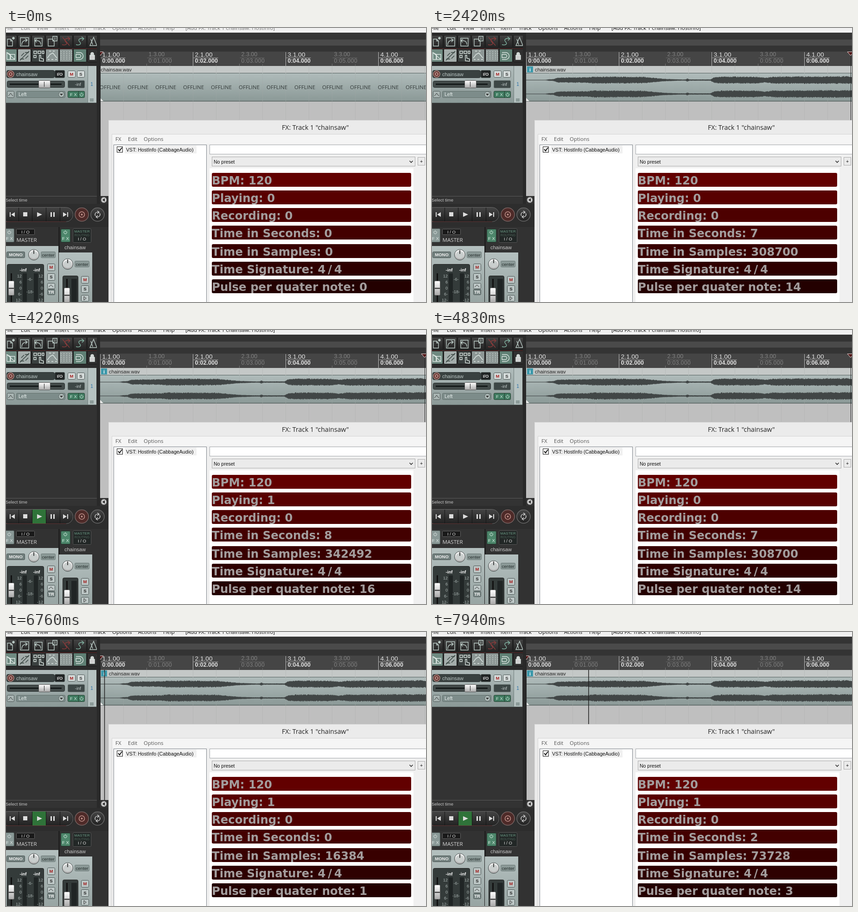
An HTML page that plays this animation: 906x592 px, repeating every 8000 ms.

```html
<!DOCTYPE html>
<html lang="en">
<head>
<meta charset="utf-8">
<title>Host info plugin</title>
<style>
html, body { margin: 0; width: 100%; height: 100%; overflow: hidden; background: #333; }
svg { display: block; }
text { font-family: "Liberation Sans", Arial, sans-serif; white-space: pre; }
.ui { font-family: "Open Sans", "Noto Sans", sans-serif; }
.big { font: bold 24.4px "DejaVu Sans", Verdana, sans-serif; }
</style>
</head>
<body>
<svg id="stage" width="906" height="592" viewBox="0 0 906 592">
<defs>
<linearGradient id="panel" x2="0" y2="1"><stop stop-color="#b0bcbb"/><stop offset="1" stop-color="#8b9997"/></linearGradient>
<linearGradient id="strip" x2="0" y2="1"><stop stop-color="#b4c0bf"/><stop offset="1" stop-color="#98a5a3"/></linearGradient>
<linearGradient id="knob" x2="0" y2="1"><stop stop-color="#fff"/><stop offset="1" stop-color="#a9a9a9"/></linearGradient>
<linearGradient id="dark" x2="0" y2="1"><stop stop-color="#444"/><stop offset="1" stop-color="#222"/></linearGradient>
</defs>
</svg>
<script>
const stage = document.getElementById('stage');
let out = '';
const rect = (x, y, w, h, fill, extra = '') =>
  out += `<rect x="${x}" y="${y}" width="${w}" height="${h}" fill="${fill}" ${extra}/>`;
const box = (x, y, w, h, fill, stroke, r = 0) =>
  rect(x + .5, y + .5, w - 1, h - 1, fill, `stroke="${stroke}" rx="${r}"`);
const text = (x, y, s, size, fill, extra = '') =>
  out += `<text x="${x}" y="${y}" font-size="${size}" fill="${fill}" ${extra}>${s}</text>`;
const path = (d, stroke, fill = 'none', extra = '') =>
  out += `<path d="${d}" stroke="${stroke}" fill="${fill}" ${extra}/>`;
const circle = (x, y, r, fill, stroke = 'none', w = 1) =>
  out += `<circle cx="${x}" cy="${y}" r="${r}" fill="${fill}" stroke="${stroke}" stroke-width="${w}"/>`;
const group = (id, draw) => { out += `<g id="${id}">`; draw(); out += '</g>'; };
const UI = 'class="ui"', MID = 'text-anchor="middle"', BOLD = 'font-weight="bold"';

function button(x, y, w, h, label, color = '#222', fill = '#bcc6c5') {
  box(x, y, w, h, fill, '#4b5554', 2);
  text(x + w / 2, y + h / 2 + 3.4, label, 9.5, color, `${MID} ${BOLD}`);
}
function power(x, y, color) {
  path(`M${x - 2.2} ${y - 2}a3.3 3.3 0 1 0 4.4 0M${x} ${y - 4}v4`, color);
}
function rotary(x, y) {
  circle(x, y, 11.5, 'url(#knob)', '#3d4645');
  circle(x, y, 8, '#c9cecd');
  path(`M${x} ${y - 10}v8`, '#222', 'none', 'stroke-width="1.6"');
  box(x + 15, y - 7, 32, 14, '#8b9997', '#6c7977', 2);
  text(x + 31, y + 3.5, 'center', 9.8, '#252d2c', MID);
}
function fader(x, y) {
  box(x, y, 13, 32, 'url(#knob)', '#666', 2);
  path(`M${x + 1} ${y + 16.5}h11`, '#222', 'none', 'stroke-width="2"');
}

function menuBar() {
  rect(0, 0, 906, 10, '#f0f0f0');
  const items = { File: -3, Edit: 32, View: 66, Insert: 105, Item: 148, Track: 187, Options: 229,
    Actions: 285, Help: 339, '[Add FX: Track 1 chainsaw: HostInfo]': 387 };
  group('menu', () => Object.entries(items).forEach(([s, x]) => text(x, 4, s, 11.5, 'inherit', UI)));
}

function toolbar() {
  rect(0, 10, 203, 72, '#2b2b2b');
  const icons = [
    ['M3 24v15h11V28l-4-4zM10 24v4h4M16 19v6m-3-3h6m-5-2 4 4m0-4-4 4', 'M2 53v15h7V57zM10 57v11h9V57zM2 53l17 15'],
    ['M31 21h18v18H31zM34 37c0-8 4-10 11-11m-4-3 5 3-4 4', 'M30 70 50 50M33 60l6-6m3 12 6-6M31 67l8 0m2-14 8 0'],
    ['M62 22h16v17H62zM75 36c0-7-4-9-12-9m4-3-5 3 4 4', 'M60 50h6v5h-6zm9 0h6v5h-6zm9 0h4v5h-4zm-18 9h5v5h-5zM72 71v-12l3 0v6l6 2v5z'],
    ['M91 24v15h13V28l-4-4zM101 18h9v10h-9zM105.500 20v6', 'M89 65l6-8 6-3 9 11M93 50h4m4 0h4M90 68h4m4 0h4m4 0h4'],
    ['M121 36c9 2 12-2 8-6s-2-9 9-7m-5-4 5 4-4 4M122 20l15 18', 'M119 50v20m6-20v20m6-20v20m6-20v20m5-20v20'],
    ['M151 36c9 2 12-2 8-6s-2-9 9-7m-5-4 5 4-4 4', 'M151 53h8a7 7 0 0 1 0 15h-8m0-4h7a3 3 0 0 0 0-7h-7z'],
    ['M181 38l8-18 7 18zM187 36l-4-12', 'M181 59h10v9h-10zM183 59v-3a3 3 0 0 1 6 0v3'],
  ];
  const lit = ['#6f8a81', '#a4adab', '#3a403f', '#8d9795', '#8d9795', '#5f8074', '#303030'];
  icons.forEach(([top, low], i) => {
    const x = 30 * i - 5;
    box(x, 15, 29, 29, 'url(#dark)', '#171717', 2);
    path(`M${x + 1} 44.5h28`, '#713333');
    box(x, 45, 29, 29, lit[i], '#171717', 2);
    path(top, i == 4 ? '#8a3b3b' : i == 5 ? '#83b6a4' : '#bbcbc6', 'none', 'stroke-width="1.4"');
    path(low, i == 1 ? '#33403c' : '#dbe5e1', i == 6 ? '#d0d0d0' : 'none', i == 4 ? 'stroke-dasharray="2"' : 'stroke-width="1.4"');
  });
}

function trackPanel() {
  rect(0, 82, 195, 80, 'url(#panel)');
  rect(177, 82, 18, 80, '#b6c2c1');
  path('M176.5 82v80M0 161.5h195', '#717f7d');
  text(185, 125, '1', 10, '#2870a7', MID);
  rect(181, 152, 8, 7, '#8b9a98');
  box(1, 91, 104, 17, '#394140', '#282e2e', 3);
  circle(10, 99.5, 7, '#613331', '#b58c84', 1.5);
  circle(10, 99.5, 3, 'none', '#d2a49a', 1.5);
  text(22, 104, 'chainsaw', 11, '#bac6c4');
  button(105, 91, 22, 17, 'I/O', '#ddd', '#202424');
  button(133, 92, 17, 15, 'M', '#a32020', '#d5dcdb');
  button(153, 92, 17, 15, 'S', '#333', '#d5dcdb');
  box(2, 114, 125, 15, '#434b4a', '#252b2b', 3);
  path('M8 121.5h112', '#151a1a', 'none', 'stroke-width="3"');
  box(70, 113, 26, 17, 'url(#knob)', '#555', 2);
  path('M82.5 116v11', '#222');
  box(133, 113, 37, 17, '#3d4746', '#66716f', 2);
  text(162, 124.5, '-inf', 9.5, '#c2cbca', 'text-anchor="end"');
  box(2, 136, 16, 15, '#a8b4b2', '#4b5554', 2);
  path('M5 147l5-6 5 6', '#333');
  box(22, 136, 106, 15, '#7d8c8a', '#65726f', 2);
  text(27, 147, 'Left', 10.5, '#e7eeec');
  circle(119.5, 143.5, 6, '#aebab8', '#586461');
  path('M116 142h7l-3.500 4z', 'none', '#333');
  box(133, 136, 37, 15, '#3f7a60', '#24402f', 2);
  text(138, 147, 'F X', 9.5, '#d9f2e5');
  path('M156.500 137v13', '#24402f');
  power(163, 143.5, '#d9f2e5');
}

function ruler() {
  rect(203, 10, 703, 72, '#343434');
  rect(203, 25, 703, 13, '#4a4a4a');
  rect(203, 51, 703, 31, '#454545');
  for (let i = 0; i < 7; i++) {
    const x = 203.5 + i * 100, main = i % 2 == 0, color = main ? '#e2e2e2' : '#808080';
    text(x + 4, main ? 62 : 60.5, `${(i >> 1) + 1}.${main ? 1 : 3}.00`, main ? 13.7 : 12.5, color);
    text(x + 4, 75, `0:0${i}.000`, main ? 12.5 : 12.2, color, main ? BOLD : 'letter-spacing=".4"');
    path(`M${x + 1} 64.500h53`, main ? '#aaa' : '#666');
    path(main ? `M${x} 52v30` : `M${x} 77v5`, main ? '#bbb' : '#777');
    path(`M${x + 50} 78v4`, '#666');
  }
}

// Jagged band around a centre line, following a few envelope points.
function waveform(mid, seed) {
  const env = [[203, .4], [244, .5], [252, 1.5], [262, 2], [270, 5], [338, 5.8], [345, 7], [455, 6.5], [500, 2.5],
    [530, 1.4], [546, 1.2], [550, 3], [555, 1.3], [600, 1.3], [608, 5.5], [625, 7], [700, 6.8], [718, 4.8], [735, 7], [906, 7.5]];
  let d = '', k = 0;
  for (let x = 203; x < 906; x++) {
    while (env[k + 1][0] <= x && k < env.length - 2) k++;
    const [[x0, a], [x1, b]] = [env[k], env[k + 1]];
    const amp = a + (b - a) * (x - x0) / (x1 - x0);
    const noise = n => .85 + .3 * Math.abs(Math.sin(x * 12.9 + n) * 437.5 % 1);
    d += `M${x + .5} ${mid - amp * noise(seed)}V${mid + amp * noise(seed + 2)}`;
  }
  path(d, '#414646');
}

function arrange() {
  rect(203, 82, 703, 298, '#bfbfbf');
  rect(203, 82, 703, 15, '#c4c8c7');
  rect(203, 97, 703, 61, 'url(#panel)');
  path('M203 97.500h703', '#566160');
  path('M203 158h703', '#6a7573', 'none', 'stroke-width="2"');
  for (let i = 1; i < 15; i++)
    path(`M${203.5 + i * 50} 82v118`, '#a2a6a5', 'none', 'stroke-dasharray="1 2"');
  path('M203 151l7 7h-7z', 'none', '#eee');
  group('offline', () => {
    text(204.5, 94, 'chainsaw.wav', 10.8, '#222');
    for (let x = 202; x < 906; x += 60) text(x, 131.5, 'OFFLINE', 11.5, '#343b3a', UI);
  });
  group('online', () => {
    rect(205, 83, 13, 13, '#3c98aa');
    text(211.5, 93.5, 'i', 11, '#fff', `${MID} ${BOLD}`);
    text(222, 94, 'chainsaw.wav', 10.8, '#222');
    path('M203 112.500h703M203 142.500h703', '#414646');
    waveform(112.5, 1);
    waveform(142.5, 5);
  });
  group('edit', () => {
    path('M-7 51.500h14l-7 8z', '#e8d0d0', '#501818');
    path('M.5 60v303', '#222');
  });
  path('', '#222', 'none', 'id="cursor" stroke-width="1.5"');
  rect(196, 10, 7, 370, '#292929');
  rect(203, 363, 18, 229, '#333');
  circle(211, 371.5, 6, '#c9c9c9', '#777');
  path('M213 368v7l-5-3.500z', 'none', '#222');
}

function transport() {
  rect(0, 162, 196, 218, '#333');
  path('M0 363.500h196', '#5b5b5b');
  text(-1, 375, 'Select time', 9.5, '#c4c4c4');
  rect(0, 380, 221, 50, '#2d2d2d');
  box(-12, 387, 157, 32, 'url(#dark)', '#686868', 15);
  rect(57, 388, 29, 30, '#2f7339', 'id="playLight"');
  path('M27.500 388v30m29-30v30m30-30v30m30-30v30', '#151515');
  path('M0 418.500h130', '#5f3434');
  path('M8 398h2v10H8zM19 398v10l-8-5zM37 398h9v9h-9zM67 398v10l11-5zM96 398h3v10h-3zM102 398h3v10h-3zM123 398v10l8-5zM132 398h2v10h-2z', 'none', '#dcdcdc');
  circle(163.500, 403, 14.5, '#4e2a28', '#7a6462', 1.5);
  circle(163.500, 403, 6, 'none', '#bd8f88', 1.6);
  circle(163.500, 403, 2, '#bd8f88');
  circle(197.500, 403, 14.5, 'url(#dark)', '#686868', 1.5);
  path('M193 406a5 5 0 0 1 4-8h3m-3-3 4 3-4 3M202 400a5 5 0 0 1-4 8h-3m3 3-4-3 4-3', '#ddd', 'none', 'stroke-width="1.2"');
}

function masterStrip() {
  rect(0, 430, 221, 162, '#323232');
  box(-3, 433, 21, 30, '#899896', '#4d5957', 2);
  power(7, 441, '#e1e9e7');
  text(0, 458, 'F X', 9.5, '#e1e9e7');
  box(22, 434, 40, 13, '#191919', '#666', 1);
  text(42, 444, 'I / O', 9.5, '#ddd', MID);
  text(22.5, 462, 'MASTER', 11.6, '#d5d5d5', UI);
  rect(0, 471, 113, 121, 'url(#strip)');
  button(1, 483, 40, 14, 'MONO', '#eee', '#717f7d');
  rotary(60, 490);
  box(2, 510, 80, 90, '#343b3a', '#222', 3);
  text(37, 526, '-inf', 9.5, '#fff', `${MID} ${BOLD}`);
  text(66, 526, '-inf', 9.5, '#fff', `${MID} ${BOLD}`);
  rect(36, 530, 9, 62, '#202525');
  rect(60, 530, 9, 62, '#202525');
  ['12', '6', '0', '6-', '12-'].forEach((s, i) => {
    text(34, 539 + i * 13, s, 9, '#aab4b2', 'text-anchor="end"');
    text(80, 539 + i * 13, i > 2 ? '-' + s.slice(0, -1) : s, 9, '#aab4b2', 'text-anchor="end"');
  });
  text(52, 546, '-6-', 9, '#aab4b2', MID);
  text(52, 573, '-18-', 9, '#aab4b2', MID);
  rect(10, 530, 3, 62, '#111');
  fader(5, 546);
  button(89, 509, 17, 16, 'M', '#a32020');
  button(89, 530, 17, 16, 'S');
  button(89, 551, 17, 13, '');
  path('M92 560l5-5 5 5', '#333');
  button(89, 564, 17, 13, 'TR', '#eee', '#7b8987');
}

function trackStrip() {
  rect(113, 430, 3, 162, '#202020');
  box(118, 434, 21, 29, '#4d866b', '#203b2e', 2);
  power(128, 441, '#e0f5ea');
  text(121, 458, 'F X', 9.5, '#e0f5ea');
  box(144, 433, 40, 31, '#222726', '#555', 2);
  text(164, 442, 'MASTER', 8, '#6e9d88', MID);
  text(164, 450, 'ROUTING', 7, '#4c6258', MID);
  text(164, 459, 'I / O', 9.5, '#ddd', MID);
  text(126, 478, 'chainsaw', 11, '#ccc');
  rect(114, 485, 72, 107, 'url(#strip)');
  rotary(133, 510);
  box(122, 535, 34, 65, '#343b3a', '#222', 3);
  rect(141, 542, 12, 50, '#202525');
  rect(130, 542, 3, 50, '#111');
  fader(125, 561);
  button(162, 536, 17, 16, 'M', '#a32020');
  button(162, 556, 17, 16, 'S');
  button(162, 577, 17, 14, '');
  path('M168 580v8l5-4z', '#333');
}

const labels = ['BPM: ', 'Playing: ', 'Recording: ', 'Time in Seconds: ', 'Time in Samples: ', 'Time Signature: ', 'Pulse per quater note: '];

function pluginWindow() {
  rect(221, 199, 685, 393, '#ebebeb');
  path('M221.500 592V199.500H906', '#d8d8d8');
  text(595, 220, 'FX: Track 1 "chainsaw"', 14.1, '#222', UI);
  rect(228, 229, 678, 363, '#f0f0f0');
  rect(229, 230, 677, 20, '#f5f5f5');
  path('M228.500 592V229.500H906', '#d4d4d4');
  text(236, 244, 'FX', 11.5, '#555', UI);
  text(263, 244, 'Edit', 11.5, '#555', UI);
  text(297, 244, 'Options', 11.5, '#555', UI);
  box(232, 252, 201, 345, '#fff', '#7f858c');
  rect(256, 254, 155, 17, '#f0f0f0');
  box(239, 256, 13, 13, '#fff', '#111');
  path('M242 262l3 3.500 5-7', '#111', 'none', 'stroke-width="2"');
  text(259, 267, 'VST: HostInfo (CabbageAudio)', 10.65, '#111');
  box(439, 252, 475, 21, '#fff', '#a5a8ac');
  box(444, 278, 439, 21, '#ebebeb', '#acacac');
  text(448, 293, 'No preset', 10.5, '#111');
  path('M870.500 287l3.500 3.500 3.500-3.500', '#333', 'none', 'stroke-width="1.6"');
  box(888, 279, 16, 18, '#ebebeb', '#acacac');
  text(896, 292, '+', 10.5, '#111', MID);
  rect(439, 303, 440, 289, '#fff');
  labels.forEach((label, i) => {
    const y = 313 + 38 * i + (i > 3 ? 2 : 0);
    rect(444, y, 430, 30, `rgb(${98 - 10.5 * i},0,0)`, 'rx="3"');
    text(444, y + 25, label, 24.4, '#a39d9d', 'class="big"');
  });
}

[menuBar, toolbar, ruler, arrange, trackPanel, transport, masterStrip, trackStrip, pluginWindow].forEach(draw => draw());
stage.insertAdjacentHTML('beforeend', out);

const el = id => document.getElementById(id);
const rows = [...document.querySelectorAll('.big')];
const show = (id, on) => el(id).style.display = on ? '' : 'none';

// Bursts of screen updates: first time, last time, number of updates.
const bursts = [[3500, 3500, 1], [3640, 3960, 5], [4100, 4830, 11], [6300, 6920, 9], [7100, 7860, 12], [7940, 7940, 1]];
function lastUpdate(t) {
  const burst = bursts.filter(b => b[0] <= t).pop();
  if (!burst) return 0;
  const [from, to, n] = burst, gap = (to - from) / (n - 1) || 1;
  return from + gap * Math.min(n - 1, Math.floor((t - from) / gap + 1e-6));
}

const RATE = 44100, BLOCK = 4096;
const blocks = ms => Math.floor(ms * RATE / 1000 / BLOCK) * BLOCK;

function render(t) {
  const now = lastUpdate(t);
  const firstRun = now >= 3500 && now < 4829, secondRun = now > 6400;
  const online = t >= 2420, moved = t >= 2200 && t < 6080;
  let samples = online && t < 6080 ? 7 * RATE : 0;
  if (firstRun) samples += 1024 + blocks(now - 3425);
  if (secondRun) samples = blocks(now - 6250);

  el('menu').setAttribute('fill', t < 2100 ? '#777' : '#111');
  show('offline', !online);
  show('online', online);
  show('playLight', firstRun || now >= 6300);
  el('edit').setAttribute('transform', `translate(${moved ? 903 : 203})`);
  el('cursor').setAttribute('d', now > 6592 ? `M${203 + (now - 6592) / 10} 82V363` : '');

  // Thin spaces open up the narrow slash of the time signature.
  const values = [120, +(firstRun || secondRun), 0, Math.round(samples / RATE), samples, '4\u2009/\u20094', Math.round(samples * 2 / RATE)];
  rows.forEach((row, i) => row.textContent = labels[i] + values[i]);
}

const start = performance.now();
function tick() {
  render((performance.now() - start) % 8000);
  requestAnimationFrame(tick);
}
tick();
</script>
</body>
</html>
```
